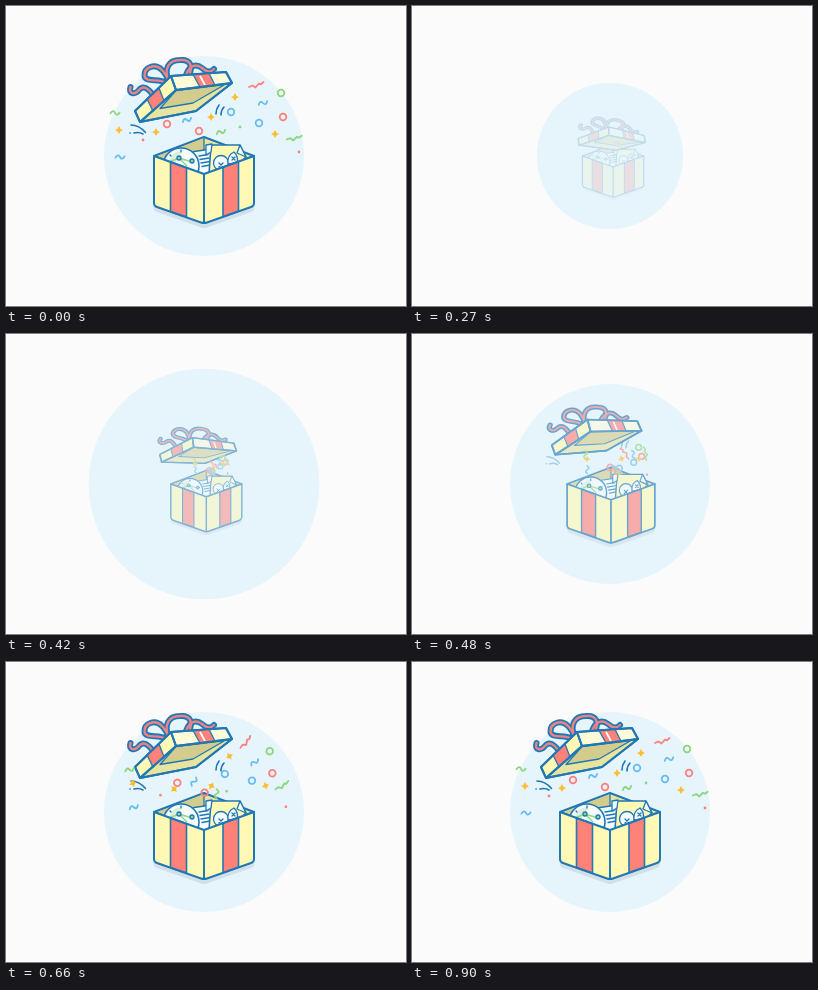
Write an HTML page that moves like this. It is 400 px wide and 300 px high and loops after 2900 ms.

```html
<!DOCTYPE html>
<html lang="en">
<head>
<meta charset="utf-8">
<title>Gift box</title>
<style>
  html, body { margin: 0; width: 100%; height: 100%; overflow: hidden; background: #fbfbfb; }
  svg { display: block; width: 100vw; height: 100vh; }
  .ink { stroke: #1f78b4; stroke-width: 2; stroke-linejoin: round; stroke-linecap: round; }
  .mid { stroke-width: 1.6; }
  .thin { stroke-width: 1.3; }
  .line { fill: none; }
  .cream { fill: #fff9b5; }
  .pale { fill: #fffbd9; }
  .khaki { fill: #d3cc8d; }
  .straw { fill: #e9e3a0; }
  .red { fill: #ff8279; }
  .white { fill: #f5fbff; }
  .bow { fill: none; stroke-linecap: round; stroke-linejoin: round; }
</style>
</head>
<body>
<svg viewBox="0 0 400 300">
  <defs>
    <g id="bow">
      <path d="M124.500 81 C122 88 129 89 133 84 S142 82 147 89"/>
      <path d="M161 77 C152 72 140 77 138.500 70 C138 61 149 57 156 64 Q161 69 163 77"/>
      <path d="M163 77 C157 62 163 54 174 54 C185 53 187 61 183 69"/>
      <path d="M180 69 C184 58 191 58 196 62 S204 67 208 63"/>
    </g>
    <path id="front" d="M148 150 L198 168 L248 150 V197 Q248 200 245 201 L201 216.500 Q198 217.500 195 216.500 L151 201 Q148 200 148 197Z"/>
  </defs>

  <circle id="disc" cx="198" cy="150" fill="#e6f4fc"/>

  <g id="gift">
    <g class="box">
      <use href="#front" y="5" fill="#d3e0e9"/>
      <path class="ink straw" d="M148 150 L198 131 L248 150 L198 168Z"/>
      <path class="khaki" d="M152 150 L198 132 V160Z"/>
      <path class="ink thin line" d="M198 132 V145"/>

      <path class="ink thin white" d="M185 146 L205 143 L210 168 H188Z"/>
      <path class="ink thin line" d="M193 150 L202 148.500 M194 153.500 L203 152 M195 157 L204 155.500 M196 160.500 L204 159"/>

      <circle class="ink mid white" cx="175" cy="160" r="18"/>
      <path fill="#d8f0dc" d="M163 155 Q166 146 175 145 L174 152 L166 160Z"/>
      <path fill="none" stroke="#8fd58c" stroke-width="1.500" d="M163 156 L173 152 L186 156 M173 152 L181 160"/>
      <path class="ink thin line" d="M175 144 V146 M164 149 L165 150"/>
      <circle class="ink thin" cx="173" cy="152" r="2" fill="#8fd58c"/>
      <circle class="ink thin" cx="186" cy="155" r="2" fill="#8fd58c"/>

      <path class="ink mid cream" d="M205 139 L234 139 L240 151 L224 166 L203 168Z"/>
      <path class="ink thin white" d="M234 139 L231 147 L240 151Z"/>
      <path class="ink thin white" d="M200 139 L206 138 L205 146 L200 149Z"/>
      <circle class="ink thin white" cx="215" cy="157" r="7.500"/>
      <path class="ink thin white" d="M222 158 Q221 149 228 146 Q233 151 231 157Z"/>
      <path class="ink thin line" d="M213 157 l4 4 m0 -4 l-4 4 M226 151 l3 3 m0 -3 l-3 3"/>
      <path id="swish" class="ink mid line" d="M124 127 h.2 M128 127 Q133 125.500 137 128 M125 119 Q133 119 139.500 126.500 M210 108 Q210 103 213 99 M215 109 Q215 104 218 101"/>
    </g>

    <g id="lid">
      <use href="#bow" class="bow" stroke="#1f78b4" stroke-width="6"/>
      <use href="#bow" class="bow" stroke="#ea8286" stroke-width="2.400"/>
      <path class="ink straw" d="M134 116 L170 84 L226 77 L190 105Z"/>
      <path class="ink thin khaki" d="M154 102.500 L170 84.500 L219 78.500 L187 97Z"/>
      <path class="ink cream" d="M129 105 L165 70 L170 84 L134 116Z"/>
      <path class="ink pale" d="M165 70 L220 66 L226 77 L170 84Z"/>
      <path class="ink thin red" d="M141 93 L153 82 L158 95 L147 105Z"/>
      <path class="ink thin red" d="M187 68.500 L203 67.200 L209 79.200 L194 81Z"/>
      <path stroke="#fff" stroke-width="1.800" d="M194 70 L199 79"/>
      <path class="ink line" d="M134 116 L129 105 L165 70 L220 66 L226 77 L190 105Z M134 116 L170 84 L226 77 M165 70 L170 84"/>
    </g>

    <g id="confetti"></g>

    <g class="box">
      <use href="#front" class="cream"/>
      <path class="ink mid red" d="M164.500 156 L180.500 161.700 V211 L164.500 205.500Z"/>
      <path class="ink mid red" d="M217 161.200 L232.500 155.600 V205.200 L217 210.700Z"/>
      <path class="ink line" d="M198 168 V217"/>
      <use href="#front" class="ink line"/>
    </g>
  </g>
</svg>

<script>
const LOOP = 2900, STEP = 30, END = 900;
const RED = '#ff7f7c', BLUE = '#66bdf2', GREEN = '#8bd67c', GOLD = '#ffbd2f';
const SOURCE = { x: 206, y: 138 }, SPIN = 130;
const $ = id => document.getElementById(id);

const shapes = {
  ring: 'M-3.300 0 a3.300 3.300 0 1 0 6.600 0 a3.300 3.300 0 1 0 -6.600 0',
  wave: 'M-4.500 1 q2.200 -4.500 4.500 -1 t4.500 -1',
  zig: 'M-7 2 l3.500 -1.500 l3 2 l3.500 -4 l2 .8 l2.500 -2.300',
  star: 'M0 -4 Q.8 -.8 4 0 Q.8 .8 0 4 Q-.8 .8 -4 0 Q-.8 -.8 0 -4Z',
  dot: 'M-1.400 0 a1.400 1.400 0 1 0 2.800 0 a1.400 1.400 0 1 0 -2.800 0'
};

// shape, colour, resting x, y, lag exponent, arc height, resting angle
const pieces = [
  ['wave', GREEN, 109, 107, 1, 31, 10],
  ['star', GOLD, 113, 124, 1, 37, 0],
  ['wave', BLUE, 114, 151, 1, 30, 5],
  ['dot', RED, 137, 134, 1.8, 10, 0],
  ['star', GOLD, 150, 126, 2.4, 13, 0],
  ['ring', RED, 161, 118, 1.6, 10, 0],
  ['wave', BLUE, 181, 114, 2, 5, -15],
  ['ring', RED, 193, 125, 3.5, 0, 0],
  ['star', GOLD, 205, 111, 4, 0, 0],
  ['wave', GREEN, 215, 126, 4, 0, -15],
  ['ring', BLUE, 225, 106, 2.4, 20, 0],
  ['star', GOLD, 229, 91, 1.7, 45, 0],
  ['dot', GREEN, 234, 121, 4, 0, 0],
  ['ring', BLUE, 253, 117, 1, 12, 0],
  ['zig', RED, 250, 79, 1.7, 70, 0],
  ['wave', BLUE, 257, 97, 1.1, 25, -10],
  ['ring', GREEN, 275, 87, 1.1, 45, 0],
  ['ring', RED, 277, 111, 1, 30, 0],
  ['star', GOLD, 269, 128, 1, 45, 0],
  ['zig', GREEN, 288, 132, 1, 72, 5],
  ['dot', RED, 293, 146, 1, 0, 0]
].map(([shape, color, x, y, lag, arc, angle]) => {
  const el = document.createElementNS('http://www.w3.org/2000/svg', 'path');
  const filled = shape === 'star' || shape === 'dot';
  el.setAttribute('d', shapes[shape]);
  el.setAttribute('fill', filled ? color : 'none');
  if (!filled) {
    el.setAttribute('stroke', color);
    el.setAttribute('stroke-width', 1.8);
    el.setAttribute('stroke-linecap', 'round');
    el.setAttribute('stroke-linejoin', 'round');
  }
  $('confetti').append(el);
  return { el, x, y, lag, arc, angle };
});

const clamp = v => Math.min(1, Math.max(0, v));
const sine = (t, from, to) => (1 - Math.cos(Math.PI * clamp((t - from) / (to - from)))) / 2;

// Smooth curve through [time, value] keys, level at both ends
function track(t, keys) {
  const last = keys.length - 1;
  if (t <= keys[0][0]) return keys[0][1];
  if (t >= keys[last][0]) return keys[last][1];
  const i = keys.findIndex(k => k[0] > t) - 1;
  const slope = n => n <= 0 || n >= last ? 0
    : (keys[n + 1][1] - keys[n - 1][1]) / (keys[n + 1][0] - keys[n - 1][0]);
  const [t0, a] = keys[i], [t1, b] = keys[i + 1];
  const h = t1 - t0, u = (t - t0) / h, v = 1 - u;
  return v * v * (1 + 2 * u) * a + u * v * v * h * slope(i)
    + u * u * (3 - 2 * u) * b - u * u * v * h * slope(i + 1);
}

const boxScale = [[180, .6], [330, .635], [420, .71], [540, 1.03], [630, 1]];
const lidX = [[180, 201], [330, 198.5], [420, 193], [540, 180.5], [630, 180]];
const lidY = [[180, 141], [330, 133.5], [420, 122.5], [540, 96.5], [630, 96.5]];
const lidTurn = [[180, 22], [330, 18], [420, 13], [540, 0], [630, 0]];
const lidScale = [[180, .65], [330, .69], [420, .76], [540, 1.03], [630, 1]];
const lidSquash = [[180, .85], [420, .85], [540, 1], [630, 1]];
const burst = [[330, 0], [420, .18], [540, .5], [660, .85], [900, 1]];

function draw(t) {
  $('disc').setAttribute('r', 118 * sine(t, 93, 400) - 18 * sine(t, 400, 480));
  $('gift').setAttribute('opacity', clamp((t - 180) / 480));
  $('swish').setAttribute('opacity', clamp((t - 420) / 120));

  const s = track(t, boxScale);
  for (const g of document.querySelectorAll('.box'))
    g.setAttribute('transform', `translate(206 150) scale(${s}) translate(-206 -150)`);

  $('lid').setAttribute('transform', `translate(${track(t, lidX)} ${track(t, lidY)})
    scale(1 ${track(t, lidSquash)}) rotate(${track(t, lidTurn)})
    scale(${track(t, lidScale)}) translate(-180 -96.5)`);

  const spread = track(t, burst);
  for (const { el, x, y, lag, arc, angle } of pieces) {
    const p = spread ** lag;
    const px = SOURCE.x + (x - SOURCE.x) * p;
    const py = SOURCE.y + (y - SOURCE.y) * p - arc * p * (1 - p);
    const size = Math.min(1, .6 + .8 * spread);
    el.setAttribute('transform',
      `translate(${px} ${py}) rotate(${angle - SPIN * (1 - p)}) scale(${size})`);
  }
}

function tick() {
  const t = performance.now() % LOOP;
  // The finished picture shows briefly before the build-up starts
  draw(t < STEP ? END : Math.floor(t / STEP) * STEP);
  requestAnimationFrame(tick);
}
draw(END);
requestAnimationFrame(tick);
</script>
</body>
</html>
```
